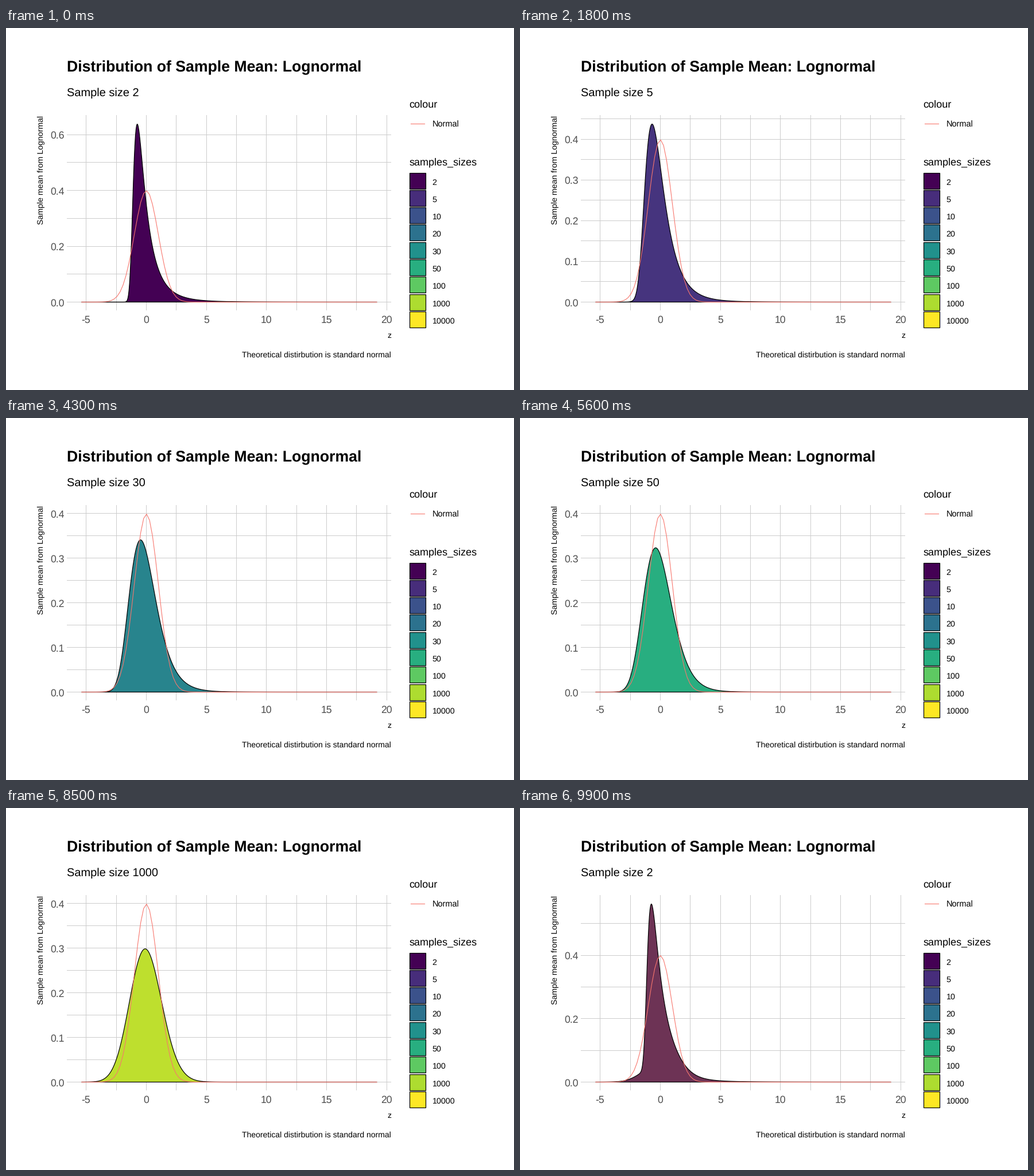
These frames come from a looping animation (885 by 632 pixels, 10 s). A matplotlib script:

```python
import numpy as np
import matplotlib.pyplot as plt
from matplotlib.animation import FuncAnimation
from matplotlib.collections import LineCollection
from matplotlib.colors import to_rgb
from matplotlib.patches import Polygon, Rectangle

W, H, DPI = 885, 632, 100
PX = 72 / DPI
FRAMES, INTERVAL = 100, 100

LEFT, RIGHT, TOP, BOTTOM = 106, 671, 152, 493
X0, X_UNIT = 244.5, 20.94           # pixel of z = 0, pixels per unit of z
Y0, Y_SPAN = 478.5, 310.8           # baseline, height of the tallest curve
Z_MIN, Z_MAX = -5.38, 19.17

SIZES = [2, 5, 10, 20, 30, 50, 100, 1000, 10000]
COUNT = len(SIZES)
FILLS = plt.get_cmap("viridis")(np.linspace(0, 1, COUNT))[:, :3]
RED, GRID, GREY = "#F8766D", "#CCCCCC", "#4D4D4D"

plt.rcParams.update({"font.family": "Liberation Sans", "text.hinting": "none",
                     "path.simplify": False, "path.snap": False})


# ---- densities ----
def mean_density(z, n):
    """Smoothed density of the scaled mean of n lognormal draws.

    The characteristic function of one draw is raised to the power n,
    damped by a Gaussian kernel and inverted.
    """
    u = np.linspace(-8, 8, 4001)
    weight = np.exp(-u ** 2 / 2)
    weight /= weight.sum()
    draw = (np.exp(u - 0.5) - 1) / np.sqrt(n)
    t, dt = np.linspace(0, 25, 501, retstep=True)
    bandwidth = 0.3 - 0.28 / n
    phi = (np.exp(1j * np.outer(t, draw)) @ weight) ** n
    phi *= np.exp(-(bandwidth * t) ** 2 / 2)
    phi[0] /= 2
    return np.maximum((np.exp(-1j * np.outer(z, t)) @ phi).real * dt / np.pi, 0)


def mix(a, b, t):
    return a + (b - a) * t


z = np.linspace(Z_MIN, Z_MAX, 512)
DENSITY = [mean_density(z, n) for n in SIZES]

zn = np.linspace(Z_MIN, Z_MAX, 101)
normal = np.exp(-zn ** 2 / 2) / np.sqrt(2 * np.pi)


# ---- colour blending in CIE Lab ----
TO_XYZ = np.array([[0.4124, 0.3576, 0.1805],
                   [0.2126, 0.7152, 0.0722],
                   [0.0193, 0.1192, 0.9505]])
WHITE = TO_XYZ.sum(axis=1)


def to_lab(color):
    c = np.array(to_rgb(color))
    c = np.where(c > 0.04045, ((c + 0.055) / 1.055) ** 2.4, c / 12.92)
    v = TO_XYZ @ c / WHITE
    fx, fy, fz = np.where(v > 0.008856, np.cbrt(v), 7.787 * v + 16 / 116)
    return np.array([116 * fy - 16, 500 * (fx - fy), 200 * (fy - fz)])


def from_lab(lab):
    fy = (lab[0] + 16) / 116
    f = np.array([fy + lab[1] / 500, fy, fy - lab[2] / 200])
    v = np.where(f > 0.2069, f ** 3, (f - 16 / 116) / 7.787) * WHITE
    c = np.clip(np.linalg.solve(TO_XYZ, v), 0, 1)
    return np.clip(np.where(c > 0.0031308, 1.055 * c ** (1 / 2.4) - 0.055,
                            12.92 * c), 0, 1)


LABS = [to_lab(c) for c in FILLS]

# ---- fixed parts ----
fig = plt.figure(figsize=(W / DPI, H / DPI), dpi=DPI, facecolor="white")
ax = fig.add_axes([0, 0, 1, 1])
ax.set(xlim=(0, W), ylim=(H, 0))
ax.axis("off")


def label(x, cy, s, size, **kw):
    """Text whose capitals are centred on cy; size in pixels."""
    return ax.text(x, cy + 0.36 * size, s, fontsize=size * PX, va="baseline", **kw)


def pixel(v):
    return np.floor(v) + 0.5


def grid_lines(segments=()):
    lines = LineCollection(segments, colors=GRID, linewidths=PX, zorder=1)
    ax.add_collection(lines, autolim=False)
    return lines


def red_line(x, y):
    return ax.plot(x, y, color=RED, lw=1.1 * PX, zorder=4)[0]


label(106, 66.3, "Distribution of Sample Mean: Lognormal", 26.6, weight="bold")
subtitle = label(106, 112, "", 20)
label(671, 536, "z", 14, ha="right")
label(671, 570, "Theoretical distirbution is standard normal", 14, ha="right")
ax.text(65.5, 152.5, "Sample mean from Lognormal", fontsize=14.1 * PX, rotation=90,
        rotation_mode="anchor", ha="right", va="baseline")

cols = pixel(X0 + X_UNIT * np.arange(-5, 20.1, 2.5))
grid_lines([[(x, TOP), (x, BOTTOM)] for x in cols])
for v in range(-5, 21, 5):
    label(X0 + X_UNIT * v - 0.5, 508, str(v), 17.6, ha="center", color=GREY)

label(702.5, 132, "colour", 18.2)
red_line([705.5, 729.5], [167.5, 167.5])
label(742.5, 167.5, "Normal", 14.5)
label(702.5, 233, "samples_sizes", 18)
for i, (n, fill) in enumerate(zip(SIZES, FILLS)):
    y = pixel(253 + 30.3 * i)
    ax.add_patch(Rectangle((703.5, y), 28, 28, fc=fill, ec="black", lw=1.2 * PX))
    label(742.5, y + 15, str(n), 14.3)

# ---- moving parts ----
rows = grid_lines()
ticks = [label(101.5, 0, "", 17.6, ha="right", color=GREY) for _ in range(6)]
shape = Polygon([(0, 0), (1, 0), (1, 1)], closed=True, ec="black", lw=1.2 * PX,
                joinstyle="round", zorder=3)
ax.add_patch(shape)
bell = red_line([], [])


def pose(frame):
    """Previous state, next state and progress between them."""
    for i in reversed(range(COUNT)):
        start = 6 + 11 * i + min(i, 2)      # the first two changes take longer
        steps = 6 if i < 2 else 5
        if frame >= start:
            return i, (i + 1) % COUNT, min((frame - start + 1) / steps, 1)
    return 0, 0, 0


def draw_axis(top, scale):
    step = 0.2 if top > 0.5245 else 0.1
    limit = top * 1.05
    ys = pixel(Y0 - scale * np.arange(0, limit, step / 2))
    rows.set_segments([[(LEFT, y), (RIGHT, y)] for y in ys])
    for i, tick in enumerate(ticks):
        v = i * step
        tick.set_visible(v <= limit)
        tick.set_text(f"{v:.1f}")
        tick.set_y(Y0 - scale * v + 0.5 + 0.36 * 17.6)


def update(frame):
    a, b, t = pose(frame)
    d = mix(DENSITY[a], DENSITY[b], t)
    top = max(d.max(), normal.max())
    scale = Y_SPAN / top
    draw_axis(top, scale)
    px = X0 + X_UNIT * z
    outline = np.column_stack([px, Y0 - scale * d])
    shape.set_xy(np.vstack([outline, (px[-1], Y0), (px[0], Y0)]))
    shape.set_facecolor(from_lab(mix(LABS[a], LABS[b], t)))
    bell.set_data(X0 + X_UNIT * zn, Y0 - scale * normal)
    subtitle.set_text(f"Sample size {SIZES[b if t >= 0.5 else a]}")
    return rows, shape, bell, subtitle, *ticks


anim = FuncAnimation(fig, update, frames=FRAMES, interval=INTERVAL,
                     repeat=True, repeat_delay=0, blit=False)
plt.show()
```
